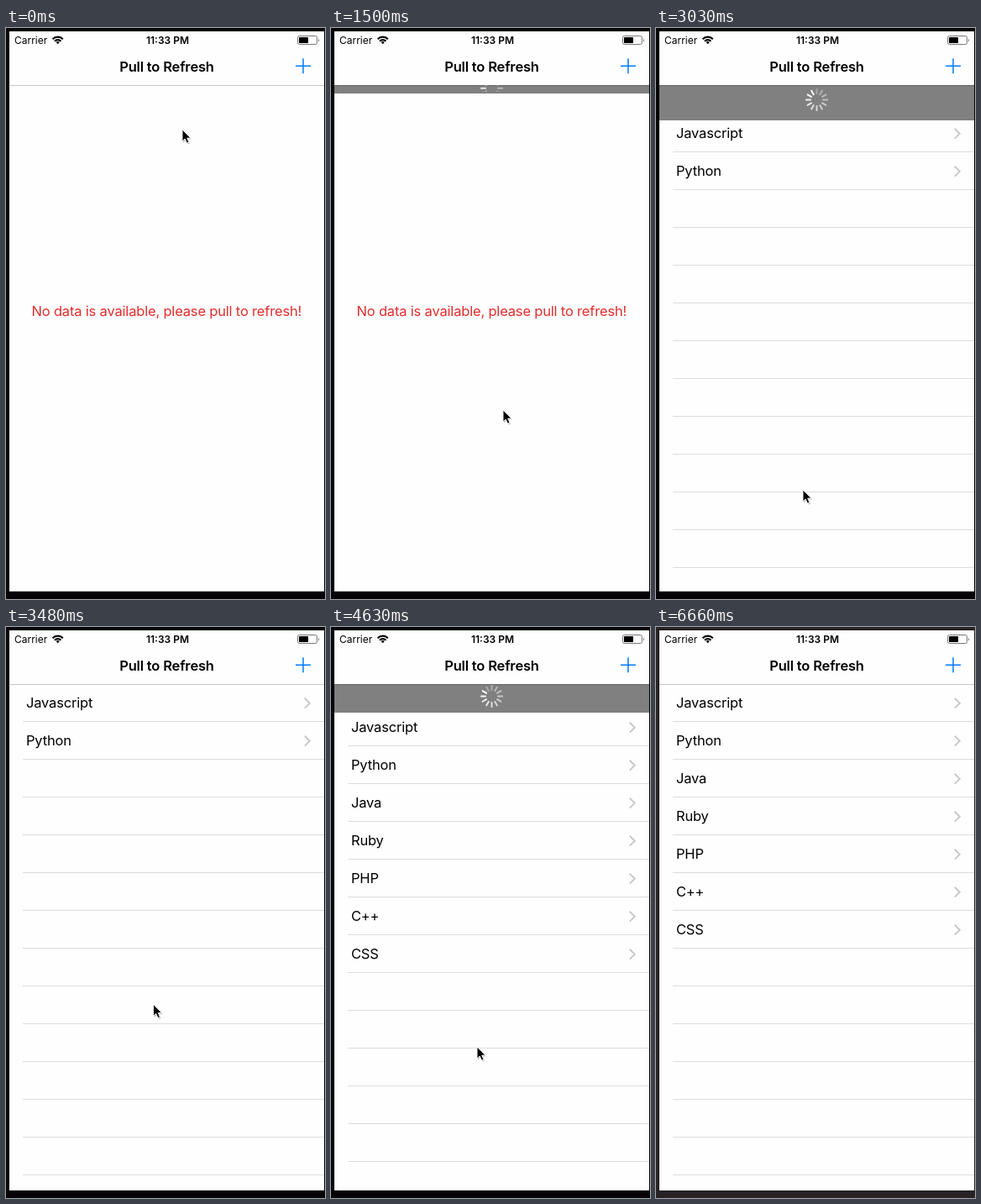
Write an HTML page that moves like this. It is 380 by 680 pixels and loops after 6.76 s.

```html
<!DOCTYPE html>
<html lang="en">
<head>
<meta charset="utf-8">
<title>Pull to Refresh</title>
<style>
  html, body { margin: 0; width: 100%; height: 100%; overflow: hidden; background: #050305; }
  svg { display: block; width: 380px; height: 680px; }
  text { font-family: Inter, Roboto, "Liberation Sans", sans-serif; font-size: 16.5px; letter-spacing: -.18px; }
  .small { font-size: 12px; letter-spacing: 0; }
  .bold { font-weight: 600; }
  .mid { text-anchor: middle; }
</style>
</head>
<body>
<svg viewBox="0 0 380 680">
  <defs>
    <clipPath id="list"><rect x="4" y="68" width="375" height="603"/></clipPath>
    <clipPath id="pulled"><rect id="window" x="4" y="68" width="375" height="0"/></clipPath>
  </defs>
  <rect id="bezel" width="380" height="680" fill="#050305"/>
  <rect x="4" y="4" width="375" height="667" fill="#fefefe"/>

  <text class="small" x="10" y="18.5">Carrier</text>
  <g fill="none" stroke="#000" stroke-width="2.1">
    <path d="M55.6 13.2a8.6 8.6 0 0 1 12.2 0M58 15.7a5.2 5.2 0 0 1 7.4 0"/>
    <path d="M61.7 19.2l-2-2.2a2.9 2.9 0 0 1 4 0z" fill="#000" stroke="none"/>
  </g>
  <text class="small bold mid" x="192.5" y="18.5">11:33 PM</text>
  <rect x="347.5" y="9.5" width="23" height="10" rx="2" fill="none" stroke="#777"/>
  <rect x="349" y="11" width="11" height="7" rx=".5"/>
  <path d="M372 12.5q1.6 2 0 4z" fill="#555"/>
  <text class="bold mid" x="191.5" y="52">Pull to Refresh</text>
  <path d="M345 45.2h18M354 36.2v18" stroke="#007aff" stroke-width="1.5"/>

  <text id="empty" class="mid" x="191.3" y="343.2" fill="#e22d2d">No data is available, please pull to refresh!</text>
  <g clip-path="url(#list)"><g id="table"></g></g>
  <rect id="shade" x="4" y="68" width="375" height="0" fill="#808080"/>
  <g clip-path="url(#pulled)">
    <g id="control">
      <g id="spinner" stroke="#fff" stroke-width="2" stroke-linecap="round"></g>
      <text id="status" class="small mid" y="30">Fetching data, waiting...</text>
    </g>
  </g>
  <rect x="4" y="68" width="375" height="1" fill-opacity=".22"/>
  <g id="cursor">
    <path d="M1 2v13.5l3.2-3 2.2 5 2.6-1.1-2.2-4.8h4.4z" fill-opacity=".25"/>
    <path d="M0 0v14l3.2-3 2.2 5.1 2.5-1.1-2.2-4.9h4.3z" stroke="#fff" stroke-width=".9"/>
  </g>
</svg>
<script>
const LOOP = 6760, LAST = 6660, STEP = LAST / 75;
const ROW = 45, STRETCH = .47, INSET = 83, BOUNCE = 540;
const $ = id => document.getElementById(id);

// Pointer moves; those with a drop time drag the list down until then.
const start = { x: 210, y: 121 };
const moves = [
  { from: 0, to: 710, x: 205, y: 455, drop: 1060, rows: 0, spin: 1 },
  { from: 1770, to: 2260, x: 183, y: 200 },
  { from: 2260, to: 2540, x: 175, y: 550, drop: 2762, rows: 2, spin: 5 },
  { from: 3250, to: 3904, x: 177, y: 168 },
  { from: 3904, to: 4244, x: 174, y: 500, drop: 4347, rows: 7, spin: 5 },
  { from: 4650, to: 5250, x: 286, y: 208 },
  { from: 5430, to: 5700, x: 340, y: 392 },
  { from: 5800, to: 6120, x: 352, y: 700 }
];
const names = ["Javascript", "Python", "Java", "Ruby", "PHP", "C++", "CSS"];

const drags = moves.filter(m => m.drop);
for (const d of drags) {
  d.fire = d.from + .72 * (d.to - d.from);
  d.travel = d.y - (moves[moves.indexOf(d) - 1] || start).y;
}

const clamp = v => Math.min(1, Math.max(0, v));
function ease(t, from, to) {
  const u = clamp((t - from) / (to - from));
  return u * u * (3 - 2 * u);
}

function pointer(t) {
  let { x, y } = start;
  for (const m of moves) {
    const e = ease(t, m.from, m.to);
    x += (m.x - x) * e;
    y += (m.y - y) * e;
  }
  return { x, y };
}

// How far a drag holds the list open: stretch, spinner inset, then bounce back.
function pull(d, t) {
  const open = STRETCH * d.travel * ease(t, d.from, d.to) + INSET * ease(t, d.fire, d.fire + 180);
  return open * (1 - clamp((t - d.drop) / BOUNCE)) ** 3;
}

function snap(time) {
  const n = Math.floor((time + 1) / STEP);
  return Math.ceil(n * STEP / 10 - .01) * 10;
}

function add(parent, tag, attrs, label = "") {
  const el = document.createElementNS("http://www.w3.org/2000/svg", tag);
  for (const key in attrs) el.setAttribute(key, attrs[key]);
  el.textContent = label;
  return parent.appendChild(el);
}

for (let i = 0; i < 13; i++) {
  add($("table"), "rect", { x: 20, y: 112 + ROW * i, width: 359, height: 1, fill: "#dddde0" });
}
const rows = names.map((name, i) => {
  const g = add($("table"), "g", { transform: `translate(0 ${68 + ROW * i})` });
  add(g, "text", { x: 24, y: 28 }, name);
  add(g, "path", { d: "M355.8 16.8l6 5.9-6 5.9", fill: "none", stroke: "#c7c7cc", "stroke-width": 1.9 });
  return g;
});
const spokes = Array.from({ length: 12 }, (_, i) =>
  add($("spinner"), "path", { d: "M0-7.5V-12.6", transform: `rotate(${30 * i})` }));

const show = (el, on) => el.setAttribute("visibility", on ? "inherit" : "hidden");
const move = (el, x, y) => el.setAttribute("transform", `translate(${x} ${y})`);

function draw(time) {
  const t = snap(time);
  const drag = drags.filter(d => d.from <= t).pop();
  const fired = t >= drag.fire;
  const y = pull(drag, t);
  const lag = t > drag.drop ? 18 : 34;
  const count = Math.max(...drags.map(d => t >= d.fire ? d.rows : 0));

  $("bezel").setAttribute("fill", t >= LAST ? "#272324" : "#050305");
  show($("empty"), !count);
  show($("table"), count);
  rows.forEach((row, i) => show(row, count > i));
  move($("table"), 0, Math.round(y));

  $("shade").setAttribute("height", Math.round(.98 * pull(drag, t - lag)));
  $("window").setAttribute("height", y);
  move($("control"), 191.5, 68 + y / 2);
  $("status").setAttribute("opacity", fired ? 1 : clamp(y / 165));

  const head = Math.floor((t - drag.fire) * .012) + drag.spin;
  const lit = Math.round((y - 54) / 7);
  spokes.forEach((s, i) => s.setAttribute("opacity",
    fired ? 1 - .062 * ((head - i + 12) % 12) : +(i < lit)));

  const p = pointer(t);
  move($("cursor"), p.x, p.y);
}

function loop() {
  draw(performance.now() % LOOP);
  requestAnimationFrame(loop);
}
loop();
</script>
</body>
</html>
```
